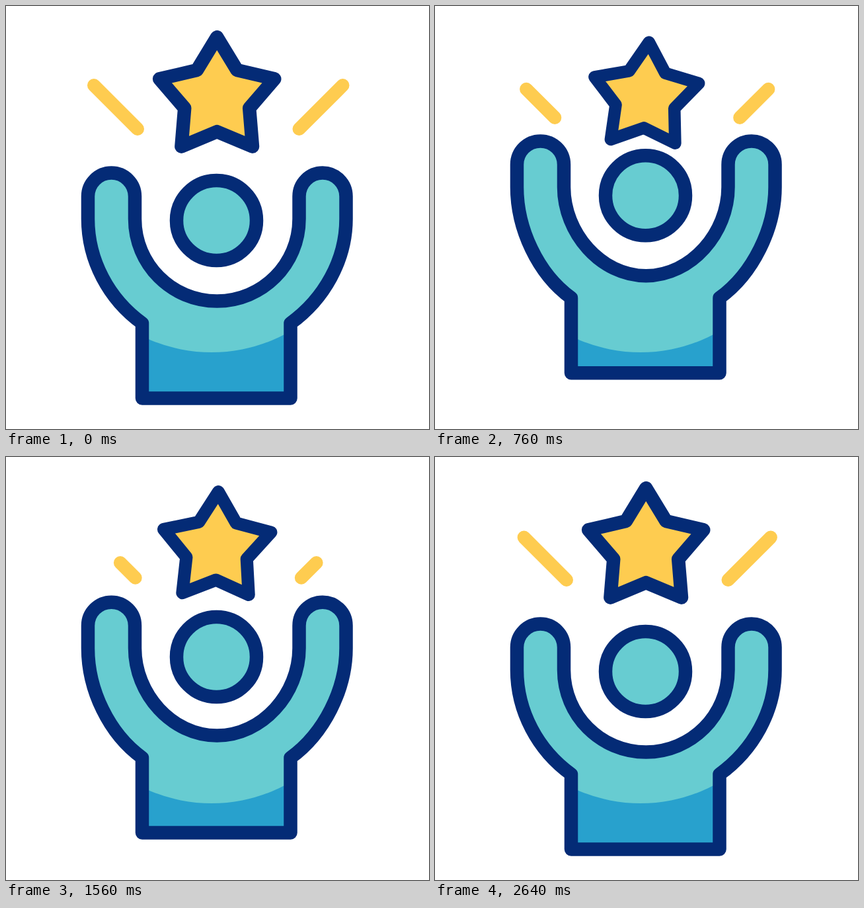
Write an HTML page that moves like this. It is 640 by 640 pixels and loops after 2680 ms.

```html
<!DOCTYPE html>
<html lang="en">
<head>
<meta charset="utf-8">
<title>Cheering figure</title>
<style>
html, body { margin: 0; width: 100%; height: 100%; overflow: hidden; background: #fff; }
svg { display: block; width: 100vw; height: 100vh; }
.ink { stroke: #042b76; stroke-width: 20.5; stroke-linejoin: round; }
.ray { stroke: #fecc50; stroke-width: 20; stroke-linecap: round; }
</style>
</head>
<body>
<svg viewBox="0 0 640 640">
  <clipPath id="inside"><path class="body"/></clipPath>
  <path class="ray"/>
  <path class="ray"/>
  <g clip-path="url(#inside)">
    <rect width="640" height="640" fill="#28a1cd"/>
    <circle cx="311" cy="286" r="238" fill="#67ccd1"/>
  </g>
  <path class="body ink" fill="none"/>
  <circle id="head" class="ink" cx="318.5" cy="324.5" r="60.5" fill="#67ccd1"/>
  <polygon id="star" class="ink" fill="#fecc50"/>
</svg>
<script>
const LOOP = 2680;
const bodies = document.querySelectorAll('.body');
const rays = document.querySelectorAll('.ray');
const head = document.getElementById('head');
const star = document.getElementById('star');

const clamp = x => Math.min(1, Math.max(0, x));
const ease = x => (1 - Math.cos(Math.PI * clamp(x))) / 2;

// Eased track with a key every 400 ms
const track = (start, values) => t => {
  const pos = clamp((t - start) / 400 / (values.length - 1)) * (values.length - 1);
  const i = Math.min(Math.floor(pos), values.length - 2);
  return values[i] + (values[i + 1] - values[i]) * ease(pos - i);
};

const torsoY = track(0, [0, 28, -40, 14, -26, 0]);
const handsY = track(0, [0, 48.5, -50.5, 34, -34.5, 0]);
const headY = track(40, [0, 45, -46.5, 21.5, -26.5, 0]);
const starAngle = track(200, [0, 11.7, -12.1, 5.7, -6.2, 2, 0]);
const starScale = track(200, [1, 0.81, 1.092, 0.902, 0.992, 1.05, 1]);

const bursts = [
  { grow: -400, move: 0, time: 400 },
  { grow: 520, move: 620, time: 800 },
  { grow: 1400, move: 1500, time: 800 },
  { grow: 2280, move: 2680, time: 400 }
];

// Star outline relative to the centre of its bounding box
star.setAttribute('points', Array.from({ length: 10 }, (_, i) => {
  const r = i % 2 ? 51.5 : 91.5, a = i * Math.PI / 5;
  return [r * Math.sin(a), 8.8 - r * Math.cos(a)];
}).join(' '));

function bodyPath(hands, torso) {
  const tip = 288 + hands, arm = 322 + hands;
  const dip = 446.5 + torso, waist = 480 + torso, hem = 593.5 + torso;
  return `M206 ${hem}V${waist}
    C155.3 ${waist - 36.6} 124 ${arm + 62.6} 124 ${arm}
    V${tip}A35.5 35.5 0 0 1 195 ${tip}V${arm}
    C195 ${arm + 68.8} 250.5 ${dip} 319.25 ${dip}
    S443.5 ${arm + 68.8} 443.5 ${arm}
    V${tip}A35.5 35.5 0 0 1 514.5 ${tip}V${arm}
    C514.5 ${arm + 62.6} 481.2 ${waist - 36.6} 430.5 ${waist}V${hem}Z`;
}

function rayPath(t, mirrored) {
  const burst = bursts.findLast(b => t >= b.grow);
  const length = 66 * ease((t - burst.grow) / 400);
  const shift = 240 * ease((t - burst.move) / burst.time);
  if (length < 0.1 || shift > 235) return '';
  const side = x => mirrored ? 642.5 - x : x;
  const x = 199 - shift, y = 186 - shift * 0.965;
  return `M${side(x)} ${y}L${side(x - length)} ${y - length}`;
}

function draw(now) {
  const t = now % LOOP;
  const outline = bodyPath(handsY(t), torsoY(t));
  bodies.forEach(b => b.setAttribute('d', outline));
  rays.forEach((r, i) => r.setAttribute('d', rayPath(t, i === 1)));
  head.setAttribute('transform', `translate(0 ${headY(t)})`);
  star.setAttribute('transform',
    `translate(319.2 129.8) rotate(${starAngle(t)}) scale(${starScale(t)})`);
}

let start;
function frame(now) {
  start ??= now;
  draw(now - start);
  requestAnimationFrame(frame);
}
draw(0);
requestAnimationFrame(frame);
</script>
</body>
</html>
```
